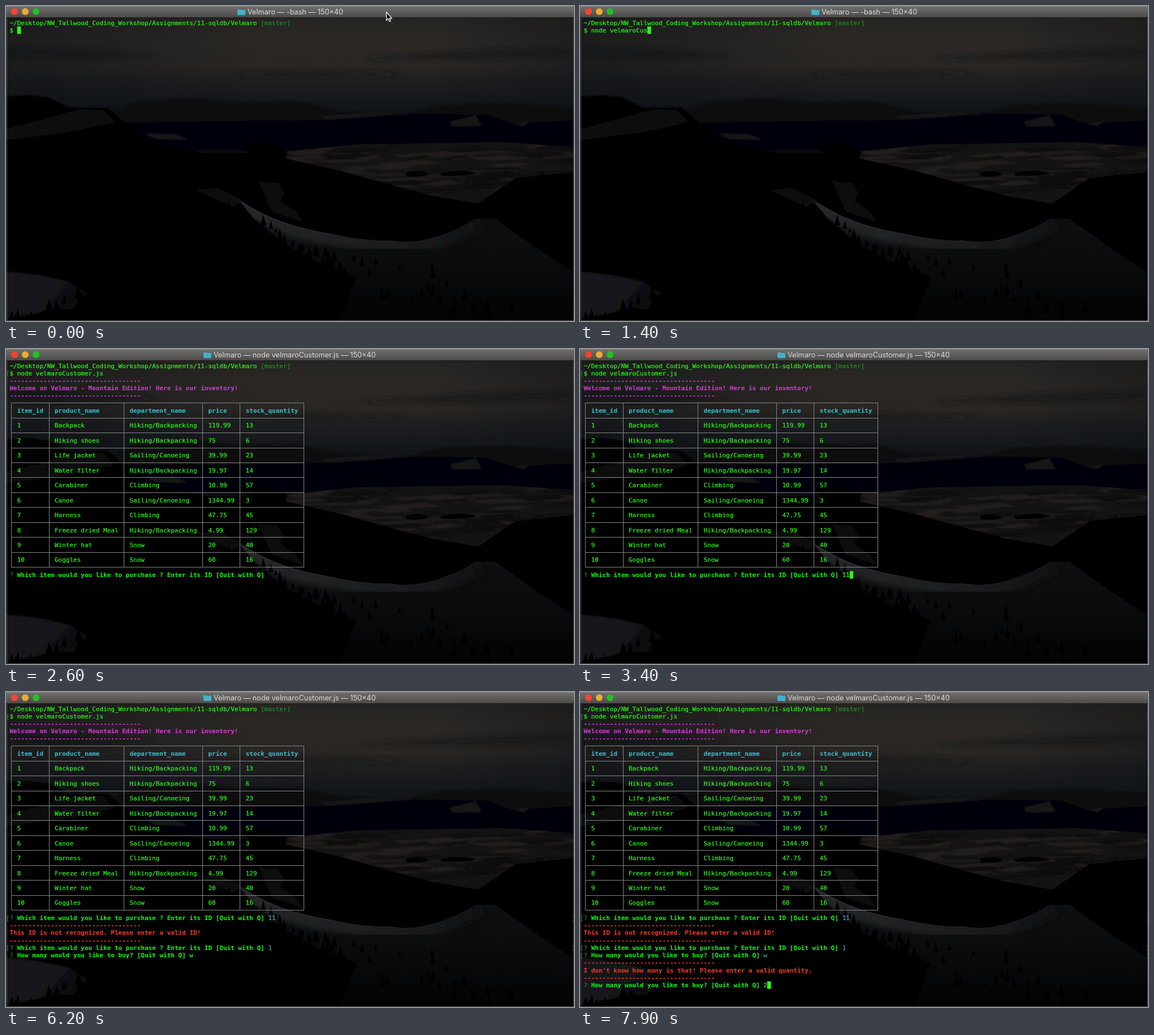
An HTML page for the animation above (8000 ms loop, 1004x558 px).

```html
<!DOCTYPE html>
<html lang="en">
<head>
<meta charset="utf-8">
<title>Terminal session</title>
<style>
html, body { margin: 0; width: 100%; height: 100%; overflow: hidden; background: #000; }
svg { display: block; }
#term { font: 11px "DejaVu Sans Mono", "Liberation Mono", monospace; }
#term text { white-space: pre; stroke-width: .2px; }
#title { font: 12.7px Inter, Roboto, sans-serif; fill: #dededd; }
.green { fill: #2cff16; stroke: #2cff16; }
.dim { fill: #1fa522; }
.mark { fill: #53705a; }
.cyan { fill: #38c0ce; }
.ask, .pink, .red, .head { font-weight: bold; }
.ask { fill: #0cff0c; }
.pink { fill: #d83ad8; }
.red { fill: #f83c20; }
.head { fill: #38c0ce; }
</style>
</head>
<body>
<svg width="1004" height="558" viewBox="0 0 1004 558">
  <defs>
    <linearGradient id="sky" gradientUnits="userSpaceOnUse" x1="0" y1="20" x2="0" y2="215">
      <stop offset="0" stop-color="#262422"/>
      <stop offset=".2" stop-color="#2b2825"/>
      <stop offset=".45" stop-color="#292623"/>
      <stop offset=".58" stop-color="#1d1e20"/>
      <stop offset=".75" stop-color="#15181b"/>
      <stop offset="1" stop-color="#0c0e10"/>
    </linearGradient>
    <linearGradient id="side">
      <stop offset="0" stop-color="#0a0d12" stop-opacity=".45"/>
      <stop offset=".45" stop-color="#0a0d12" stop-opacity="0"/>
      <stop offset=".75" stop-color="#0a0d12" stop-opacity="0"/>
      <stop offset="1" stop-color="#0a0d12" stop-opacity=".35"/>
    </linearGradient>
    <linearGradient id="slope" gradientUnits="userSpaceOnUse" x1="0" y1="350" x2="0" y2="540">
      <stop offset="0" stop-color="#0f1012"/>
      <stop offset=".5" stop-color="#0b0c0d"/>
      <stop offset="1" stop-color="#040405"/>
    </linearGradient>
    <linearGradient id="glow" gradientUnits="userSpaceOnUse" x1="403" y1="0" x2="850" y2="0">
      <stop offset="0" stop-color="#303134"/>
      <stop offset=".6" stop-color="#222326"/>
      <stop offset="1" stop-color="#121315"/>
    </linearGradient>
    <linearGradient id="patch" x2=".9" y2=".4">
      <stop offset="0" stop-color="#17191c"/>
      <stop offset=".6" stop-color="#15161a"/>
      <stop offset="1" stop-color="#050506"/>
    </linearGradient>
    <linearGradient id="bar" x2="0" y2="1">
      <stop offset="0" stop-color="#71706e"/>
      <stop offset="1" stop-color="#4c4b49"/>
    </linearGradient>
    <filter id="soft"><feGaussianBlur stdDeviation="14 4"/></filter>
    <filter id="blur"><feGaussianBlur stdDeviation="1.5"/></filter>
    <clipPath id="valley"><path d="M490 258L620 245 880 241 1004 250V294L900 305 835 350 740 334 600 294 495 270"/></clipPath>
    <clipPath id="snow"><path id="ridge" d="M403 337C450 370 490 386 540 397S640 411 690 417S800 397 830 377L865 368 930 420 1004 470V558H500C480 470 470 400 403 337"/></clipPath>
  </defs>

  <rect width="1004" height="558"/>
  <rect y="20" width="1004" height="240" fill="url(#sky)"/>
  <g filter="url(#soft)" fill="#1a1b1d">
    <path d="M640 92Q800 78 1004 75V86Q860 98 640 94"/>
    <path d="M0 76Q140 72 260 88Q140 100 0 90"/>
    <path d="M420 118Q560 110 700 122Q540 128 420 124"/>
  </g>
  <rect y="20" width="1004" height="240" fill="url(#side)"/>
  <g filter="url(#blur)">
    <path fill="#0b0d10" d="M180 190L230 169 340 163 400 170 520 169 590 186 720 189 760 176 880 171 1004 180V250H180"/>
    <path fill="#121416" d="M560 195Q650 184 740 191L690 200H560"/>
    <path fill="#050607" d="M210 206L430 203 560 202 720 190 850 192 895 208 1004 202V256H210"/>
    <path fill="#020303" d="M0 160L40 158 75 162 112 180 180 180 210 206 240 222V250H0"/>
    <path fill="#08090b" d="M0 218L60 202 130 183 172 184 192 206 110 224 0 238"/>
    <path fill="#171718" d="M785 205L830 194 840 212 790 213M898 208L925 204 915 213M245 226L300 228 322 237 265 235"/>
  </g>
  <g clip-path="url(#valley)">
    <rect x="480" y="240" width="524" height="120" fill="#131314"/>
    <g id="fields" filter="url(#blur)"></g>
    <path fill="#020202" d="M707 296Q726 288 746 297Q740 304 708 302M768 296Q800 288 831 296Q826 301 770 301"/>
  </g>
  <path filter="url(#blur)" fill="#020202" d="M420 240Q480 244 497 256L496 266 460 268 420 256"/>
  <path d="M0 238L240 238 310 252 400 272 450 308 490 312 540 288 640 306 760 338 835 354 880 318 940 300 1004 297V558H0"/>
  <path fill="#08090a" filter="url(#blur)" d="M445 309Q470 315 505 311L485 345 555 392 470 365"/>
  <use href="#ridge" fill="url(#slope)"/>
  <g clip-path="url(#snow)" fill="none" stroke="url(#glow)">
    <path filter="url(#soft)" stroke-width="34" opacity=".75" d="M403 341C450 374 490 390 540 401S640 415 690 421S800 401 830 381"/>
    <path stroke-width="3" d="M403 337C450 370 490 386 540 397S640 411 690 417S800 397 830 377"/>
  </g>
  <path d="M480 312L540 288 760 338 835 354 826 374C790 398 760 412 690 415S560 400 530 392"/>
  <path d="M832 377L880 318 1004 297V472Q930 425 865 377"/>
  <g filter="url(#blur)">
    <path fill="url(#patch)" d="M0 470L60 477 110 488 155 515 170 540 90 536 0 556"/>
    <path d="M395 365L440 378 490 420 560 458 620 480 590 558H470"/>
    <path fill="#0c0d0e" d="M335 326L375 322 420 345 400 356"/>
  </g>
  <g id="trees"></g>

  <rect width="1004" height="20" fill="url(#bar)"/>
  <path d="M0 .5H1004" stroke="#8c8b89"/>
  <path d="M0 20.5H1004" stroke="#1c1c1b"/>
  <path d="M1.5 21V557.5H1003.5V21" fill="none" stroke="#565757"/>
  <circle cx="15" cy="10" r="6" fill="#fc4130"/>
  <circle cx="34" cy="10" r="6" fill="#e9ac2d"/>
  <circle cx="53" cy="10" r="6" fill="#24c026"/>
  <path id="folder" fill="#40b3cb" d="M0 7Q0 6 1 6H5L7 7H13Q14 7 14 8V15Q14 16 13 16H1Q0 16 0 15"/>
  <text id="title" y="15"></text>

  <g id="term"></g>
  <rect id="caret" width="6.6" height="13.2" fill="#2cff16"/>
  <path id="mouse" stroke="#fff" stroke-width="1.3" d="M672.5 11V25.5L675.5 22.5 678 27.5 680 26.5 677.7 21.8H682Z"/>
</svg>
<script>
const LOOP = 8000, CW = 6.622, LH = 13.23, LEFT = 6.5;
const NS = 'http://www.w3.org/2000/svg';
const $ = id => document.getElementById(id);
const colX = col => LEFT + col * CW;
const midY = row => 29.5 + row * LH;
const parts = [];   // things shown from one time until another
const carets = [];  // [time, column, row]

function add(parent, tag, attrs, text = '') {
  const el = document.createElementNS(NS, tag);
  for (const k in attrs) el.setAttribute(k, attrs[k]);
  el.textContent = text;
  return parent.appendChild(el);
}

function put(row, col, text, cls, from = 0, to = LOOP) {
  const el = add($('term'), 'text', { x: colX(col), y: midY(row) + 4, class: cls }, text);
  parts.push({ el, from, to });
}

// Square brackets in the margins of an entered line
function mark(row, from) {
  put(row, -1, '[', 'mark', from);
  put(row, 150, ']', 'mark', from);
}

function banner(row, text, cls, from) {
  const rule = '-'.repeat(35);
  [rule, text, rule].forEach((s, i) => put(row + i, 0, s, cls, from));
}

// A question, its keys with their times, and the time of Enter
function ask(row, text, from, answer, times, enter = LOOP) {
  const col = text.length + 3;
  put(row, 0, '?', 'dim', from);
  put(row, 2, text, 'ask', from);
  carets.push([from, col, row]);
  times.forEach((t, i) => {
    put(row, col + i, answer[i], 'green', t, enter);
    carets.push([t, col + i + 1, row]);
  });
  put(row, col, answer, 'cyan', enter);
  mark(row, enter);
}

function table(from) {
  const edges = [0, 10, 30, 51, 61, 78];
  const rows = `item_id,product_name,department_name,price,stock_quantity
1,Backpack,Hiking/Backpacking,119.99,13
2,Hiking shoes,Hiking/Backpacking,75,6
3,Life jacket,Sailing/Canoeing,39.99,23
4,Water filter,Hiking/Backpacking,19.97,14
5,Carabiner,Climbing,10.99,57
6,Canoe,Sailing/Canoeing,1344.99,3
7,Harness,Climbing,47.75,45
8,Freeze dried Meal,Hiking/Backpacking,4.99,129
9,Winter hat,Snow,20,40
10,Goggles,Snow,60,16`.split('\n');
  const snap = v => Math.floor(v) + .5;
  const xs = edges.map(c => snap(colX(c + .5)));
  const top = snap(midY(5)), bottom = snap(midY(27));
  let d = xs.map(x => `M${x} ${top}V${bottom}`).join('');
  for (let i = 0; i < 12; i++) d += `M${xs[0]} ${snap(midY(5 + 2 * i))}H${xs[5]}`;
  parts.push({ el: add($('term'), 'path', { d, stroke: '#858585' }), from, to: LOOP });
  rows.forEach((line, r) => line.split(',').forEach((cell, c) =>
    put(6 + 2 * r, edges[c] + 2, cell, r ? 'green' : 'head', from)));
}

// Fields and firs, the same on every load
function landscape() {
  let seed = 7;
  const rnd = () => (seed = seed * 16807 % 2147483647) / 2147483647;
  const streaks = (n, fill) => {
    let d = '';
    for (let i = 0; i < n; i++) {
      const w = 20 + 70 * rnd(), h = 2 + 4 * rnd();
      d += `M${470 + 500 * rnd()} ${245 + 100 * rnd()}l${w} ${-h}l${w * .4} ${h}l${-w} ${h}z`;
    }
    add($('fields'), 'path', { d, fill });
  };
  const grove = (n, x0, y0, x1, y1, spread, size) => {
    let d = '';
    for (let i = 0; i < n; i++) {
      const f = rnd(), h = size * (.6 + rnd() * .7);
      const x = x0 + (x1 - x0) * f, y = y0 + (y1 - y0) * f + spread * (rnd() - .5);
      d += `M${x} ${y - h}l${h * .28} ${h}h${-h * .56}z`;
    }
    add($('trees'), 'path', { d });
  };
  streaks(60, '#201e1c');
  streaks(40, '#0b0b0c');
  grove(34, 385, 360, 600, 472, 22, 16);
  grove(30, 560, 470, 900, 530, 75, 17);
  grove(26, 840, 350, 1000, 302, 8, 9);
  grove(20, 0, 556, 160, 552, 6, 14);
  grove(14, 70, 545, 175, 510, 14, 20);
  grove(24, 540, 296, 830, 357, 6, 8);
}

const START = 300, TAB = 1600, RUN = 2300, LIST = 2600;
const command = 'node velmaroCustomer.js', typed = 15;
const keyTime = i => START + i * 73;

put(0, 0, '~/Desktop/NW_Tallwood_Coding_Workshop/Assignments/11-sqldb/Velmaro', 'green');
put(0, 67, '[master]', 'dim');
put(1, 0, '$', 'green');
carets.push([0, 2, 1]);
for (let i = 0; i < typed; i++) {
  put(1, 2 + i, command[i], 'green', keyTime(i));
  carets.push([keyTime(i), 3 + i, 1]);
}
put(1, 2 + typed, command.slice(typed), 'green', TAB);
carets.push([TAB, 2 + command.length, 1], [RUN, 0, 2]);
mark(1, RUN);

banner(2, 'Welcome on Velmaro - Mountain Edition! Here is our inventory!', 'pink', LIST);
table(LIST);
const which = 'Which item would you like to purchase ? Enter its ID [Quit with Q]';
const howMany = 'How many would you like to buy? [Quit with Q]';
ask(28, which, LIST, '11', [3150, 3350], 3700);
banner(29, 'This ID is not recognized. Please enter a valid ID!', 'red', 3700);
ask(32, which, 3700, '1', [4950], 5250);
ask(33, howMany, 5250, 'w', [6050], 6350);
banner(34, "I don't know how many is that! Please enter a valid quantity.", 'red', 6350);
ask(37, howMany, 6350, '2', [7750]);
parts.push({ el: $('mouse'), from: 0, to: START });
landscape();

// Caret opacity: hold, quick fade out, pause, slow fade in
function blink(t) {
  const p = t % 1100;
  return p <= 300 ? 1 : p < 400 ? (400 - p) / 100 : p < 700 ? 0 : (p - 700) / 400;
}

function draw(now) {
  const t = now % LOOP;
  for (const { el, from, to } of parts)
    el.style.display = t >= from && t < to ? '' : 'none';
  const [, col, row] = carets.filter(c => c[0] <= t).pop();
  const caret = $('caret');
  caret.setAttribute('x', colX(col));
  caret.setAttribute('y', 23 + row * LH);
  caret.style.opacity = blink(t);
  const running = t >= RUN, x = running ? 349 : 409;
  $('folder').setAttribute('transform', `translate(${x})`);
  $('title').setAttribute('x', x + 18);
  const text = `Velmaro — ${running ? command : '-bash'} — 150×40`;
  if ($('title').textContent !== text) $('title').textContent = text;
  requestAnimationFrame(() => draw(performance.now()));
}
draw(0);
</script>
</body>
</html>
```
